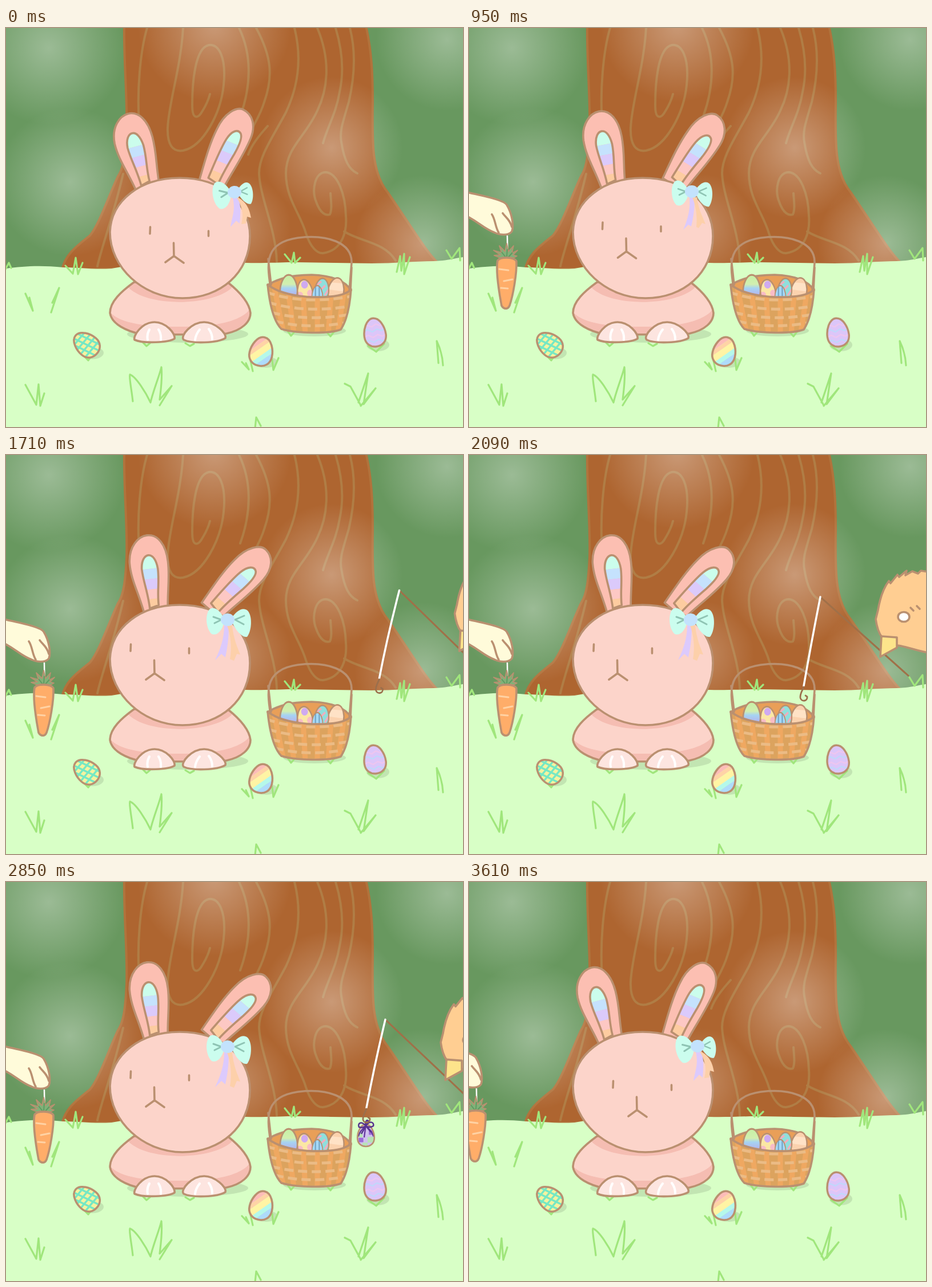
An HTML page that plays this animation: 800x700 px, repeating every 3.8 s.

```html
<!DOCTYPE html>
<html lang="en">
<head>
<meta charset="utf-8">
<title>Spring bunny</title>
<style>
html, body { margin: 0; width: 100%; height: 100%; overflow: hidden; background: #d8ffc6; }
svg { display: block; width: 100%; height: 100%; }
.ink { stroke: #ba9070; stroke-width: 3.6; stroke-linecap: round; stroke-linejoin: round; }
.line { fill: none; }
.grain { fill: none; stroke: #b07d45; stroke-width: 4; stroke-linecap: round; }
.grass { fill: none; stroke: #a0e67c; stroke-width: 3.2; stroke-linecap: round; stroke-linejoin: round; }
.shade { fill: #a9c79c; opacity: .45; }
</style>
</head>
<body>
<svg viewBox="0 0 800 700" xmlns="http://www.w3.org/2000/svg">
<defs>
  <radialGradient id="glow">
    <stop offset="0" stop-color="#fff" stop-opacity=".34"/>
    <stop offset=".5" stop-color="#fff" stop-opacity=".17"/>
    <stop offset="1" stop-color="#fff" stop-opacity="0"/>
  </radialGradient>
  <linearGradient id="dawn" x2="0" y2="1">
    <stop offset=".1" stop-color="#c9f0a8"/>
    <stop offset=".35" stop-color="#d2efb0"/>
    <stop offset=".5" stop-color="#a6d3f3"/>
    <stop offset=".85" stop-color="#b9a9ea"/>
  </linearGradient>
  <path id="egg" d="M0-26C13-26 20-7 20 5C20 18 11 25 0 25C-11 25-20 18-20 5C-20-7-13-26 0-26Z"/>
  <clipPath id="eggClip"><use href="#egg"/></clipPath>
  <path id="basketShape" d="M458 450C480 468 520 473 556 472C578 471 598 467 604 458C602 488 596 514 586 529C565 537 508 536 482 528C470 516 462 490 458 450Z"/>
  <clipPath id="basketClip"><use href="#basketShape"/></clipPath>
  <path id="bodyShape" d="M224 446C202 462 182 480 182 500C185 520 212 532 236 537C285 538 350 538 386 536C413 530 428 516 428 500C426 482 408 462 388 446Z"/>
  <clipPath id="bodyClip"><use href="#bodyShape"/></clipPath>
  <path id="innerL" d="M-10-2C-10-30-16-50-16-72C-15-88-8-95-2-95C6-95 11-85 12-70C12-45 6-30 6-6Z"/>
  <path id="innerR" d="M-9-4C-9-30-9-60-6-78C-3-96 6-103 13-98C21-92 18-68 17-60C14-40 11-20 11 0Z"/>
  <clipPath id="clipL"><use href="#innerL"/></clipPath>
  <clipPath id="clipR"><use href="#innerR"/></clipPath>
  <g id="bands">
    <path fill="#cbfdec" d="M-30-110H30V-71H-30Z"/>
    <path fill="#c5e2fd" d="M-30-71H30V-53H-30Z"/>
    <path fill="#dbcafb" d="M-30-53H30V-35H-30Z"/>
    <path fill="#fdc8c4" d="M-30-35H30V-18H-30Z"/>
    <path fill="#fdcca0" d="M-30-18H30V8H-30Z"/>
  </g>
</defs>

<rect width="800" height="700" fill="#68985f"/>
<path d="M207-4C206 60 213 130 211 180C209 220 206 246 196 260C180 294 163 345 147 364C125 382 104 396 98 424L756 412C735 392 712 352 668 288C640 254 641 200 642 130C642 80 640 40 630-4Z" fill="#ae6530" stroke="#b1733c" stroke-width="4"/>
<g class="grain">
  <path d="M247 0C235 40 229 110 233 165M205 256C188 330 167 385 160 418"/>
  <path d="M310 0C306 70 285 130 283 175C282 205 292 218 310 215C345 208 376 150 381 100C386 50 372 28 355 30C330 35 326 100 326 135C326 165 338 156 343 147C350 136 355 124 357 116"/>
  <path d="M408 0C430 45 430 100 410 155M438 0C465 50 468 85 452 130C446 150 438 162 430 178M458 172C442 190 430 205 424 222"/>
  <path d="M505 0C520 60 508 110 490 148C465 195 443 225 443 255C445 300 472 350 474 410"/>
  <path d="M545 0C570 60 562 110 545 145C525 190 490 210 490 255C490 300 515 325 525 360C533 385 545 396 555 395C590 390 597 355 595 330C594 290 580 255 560 253C540 253 535 285 543 305C550 325 560 330 567 327C571 318 569 305 568 290"/>
  <path d="M577 0C592 50 590 85 584 112C578 150 562 175 555 202M602 0C615 50 607 100 600 130C588 170 584 182 587 200C592 232 600 248 615 255M592 357C620 375 662 375 682 408"/>
</g>
<g fill="url(#glow)">
  <circle cx="75" cy="35" r="135"/><circle cx="112" cy="270" r="130"/>
  <circle cx="772" cy="20" r="125"/><circle cx="365" cy="-5" r="135"/>
  <circle cx="570" cy="210" r="125"/><circle cx="730" cy="378" r="120"/>
  <circle cx="405" cy="350" r="95" opacity=".7"/>
</g>
<path fill="#d8ffc6" d="M0 422C30 418 60 416 100 420C130 420 150 424 185 422C220 415 260 410 300 411L420 412C450 413 480 411 500 411L640 413C680 413 715 409 750 409C775 408 790 403 800 402V700H0Z"/>

<g class="grass">
  <path d="M-2 425L5 412L9 421M104 417L117 431L122 403L126 432L134 412M34 466L47 496L41 473M79 499L93 456L81 482"/>
  <path d="M222 655C220 635 215 612 217 608C228 612 245 640 253 657C258 635 268 612 272 595C274 615 271 635 269 652L290 628L269 662"/>
  <path d="M34 626L53 661L57 625L60 663L67 641M593 624L603 629L621 662M617 657L634 606L626 660L647 632L621 663M757 588L754 549Q764 570 765 592"/>
  <path d="M436 702L438 683L446 698M684 428L690 400L692 426L697 396L697 432L707 402"/>
  <path d="M771 390L780 405L794 386L795 408M488 397L500 412L504 394L506 412L515 403"/>
</g>

<g class="shade">
  <ellipse cx="318" cy="537" rx="106" ry="15"/><ellipse cx="540" cy="531" rx="55" ry="10"/>
  <ellipse cx="151" cy="570" rx="20" ry="11"/><ellipse cx="455" cy="586" rx="20" ry="10"/>
  <ellipse cx="651" cy="556" rx="20" ry="11"/>
</g>
<g class="grass" stroke-width="2.5">
  <path d="M413 586L425 599L420 588M428 584L432 602M466 582L468 600L477 579M137 576L144 583L151 574M634 558L648 568L662 554M492 530L499 540L505 533M562 534L568 541L578 528M240 552L246 558L252 553M314 553L322 558L329 554"/>
</g>

<!-- eggs on the grass -->
<g transform="translate(141 555.500) rotate(-50) scale(.96)">
  <use href="#egg" fill="#f3f3a0"/>
  <path clip-path="url(#eggClip)" class="line" stroke="#75e8c4" stroke-width="3.500" d="M-22-17H22M-22-7H22M-22 3H22M-22 13H22M-18-28L-4 28M-7-28L7 28M4-28L18 28"/>
  <use href="#egg" class="ink line"/>
</g>
<g transform="translate(447 568) rotate(13)">
  <g clip-path="url(#eggClip)"><g transform="rotate(-48)">
    <path fill="#fdbcb8" d="M-40-40H40V-13H-40Z"/><path fill="#ffd3a6" d="M-40-13H40V-6H-40Z"/>
    <path fill="#fff4a4" d="M-40-6H40V5H-40Z"/><path fill="#b5f8ea" d="M-40 5H40V13H-40Z"/>
    <path fill="#aedbfb" d="M-40 13H40V40H-40Z"/>
  </g></g>
  <use href="#egg" class="ink line"/>
</g>
<g transform="translate(645.500 534.500) rotate(-8) scale(.95 .98)">
  <use href="#egg" fill="#dcc6f9"/>
  <g clip-path="url(#eggClip)" class="line" stroke-width="2.500" opacity=".75">
    <path stroke="#f3c6ec" d="M-20-12L-12-15L-4-11L4-15L12-11L20-14M-22 7L-13 3L-4 8L5 4L13 8L22 4"/>
    <path stroke="#b9dcfb" d="M-22-3L-13-7L-4-2L5-6L13-2L22-6M-22 16L-13 12L-4 17L5 13L13 17L22 13"/>
  </g>
  <use href="#egg" class="ink line"/>
</g>

<!-- basket back and handle -->
<path class="ink" fill="#e99f58" d="M458 451C480 437 510 433 535 433C565 434 592 441 604 460C570 482 490 480 458 451Z"/>
<path class="ink line" d="M463 454C456 410 454 376 512 368C562 362 606 376 605 412L601 462M459 405L464 450M605 420L603 460"/>

<!-- fishing rod and chick -->
<g id="fisher">
  <path id="rod" class="line" stroke="#a07048" stroke-width="3"/>
  <path id="thread" class="line" stroke="#fff" stroke-width="3.500" stroke-linecap="round"/>
  <g id="hook">
    <g id="prize">
      <g transform="translate(-1 49) scale(.74 .76)">
        <use href="#egg" fill="#cfc0ee"/>
        <g clip-path="url(#eggClip)">
          <path fill="#b7e3b5" d="M-20-10H-8V4H-20ZM4 3H20V16H4ZM-8 16H4V26H-8Z"/>
          <path fill="#9b6bd8" d="M-17 5H-6V15H-17ZM7-12H16V-2H7Z"/>
          <path class="line" stroke="#63359c" stroke-width="3" d="M0-26L-4 4M0-22Q-14-12-18 2M0-22Q14-12 18 2"/>
        </g>
        <use href="#egg" class="ink line"/>
      </g>
      <path class="line" stroke="#56328f" stroke-width="2.500" d="M-1 32C-10 22-16 28-13 34Q-7 36-1 32C6 21 14 26 12 32Q6 36-1 32L-9 46M-1 32L8 43M-1 32C-3 24 1 20 3 23Z"/>
    </g>
    <path class="line" stroke="#9b6f4c" stroke-width="2.800" stroke-linecap="round" d="M0 2C-3 9-7 15-6 21C-4 29 7 27 6 19L3 17"/>
  </g>
  <g id="chick">
    <path class="ink" fill="#ffce92" d="M815 207L791 203L786 208L776 204L764 211L766 203L753 214L750 210L738 225L735 221C722 238 718 260 716 272L712 288C714 303 717 312 723 320L749 334C765 335 778 343 815 349Z"/>
    <path class="ink" fill="#fde48b" d="M722 318L749 320L749 338L720 354Z"/>
    <ellipse class="ink" fill="#fff" cx="761" cy="284" rx="10" ry="8.500"/>
    <path class="ink line" stroke-width="3" d="M773 268L778 273M784 265L789 270"/>
  </g>
</g>

<!-- basket eggs and front -->
<g transform="translate(495 457) scale(.76 .92)"><use href="#egg" fill="url(#dawn)" class="ink"/></g>
<g transform="translate(578 459) scale(.7 .8) rotate(12)">
  <use href="#egg" fill="#fbd2ae"/><path clip-path="url(#eggClip)" fill="#ffe2c6" d="M-22-12L22-18V0L-22 4Z"/><use href="#egg" class="ink line"/>
</g>
<g transform="translate(523 461) scale(.66 .76) rotate(-10)">
  <use href="#egg" fill="#fbe7a4"/>
  <g clip-path="url(#eggClip)"><circle cx="2" cy="-14" r="9" fill="#cfaaf0"/><circle cx="-14" cy="8" r="8" fill="#f8bcc6"/><circle cx="13" cy="8" r="8" fill="#f8bcc6"/></g>
  <use href="#egg" class="ink line"/>
</g>
<g transform="translate(553 458) scale(.62 .72) rotate(8)">
  <use href="#egg" fill="#8fdfdc"/>
  <path clip-path="url(#eggClip)" class="line" stroke="#f0aebf" stroke-width="5" d="M-18-6L-4-18M-8 8L8-10M10 14L20-4"/>
  <use href="#egg" class="ink line"/>
</g>
<g transform="translate(545 469) scale(.48 .66)">
  <use href="#egg" fill="#a5d8f6"/>
  <path clip-path="url(#eggClip)" class="line" stroke="#6f9fc0" stroke-width="4" d="M-7-26V25M7-26V25"/>
  <use href="#egg" class="ink line"/>
</g>
<use href="#basketShape" fill="#dca35e"/>
<g clip-path="url(#basketClip)" class="line">
  <path stroke="#efa861" stroke-width="9" d="M469 452L485 530M494 462L504 536M520 466L524 538M545 468L545 538M569 466L564 538M592 460L581 534"/>
  <path stroke="#ebbb85" stroke-width="5" stroke-dasharray="16 8" d="M455 463Q520 487 608 470M458 481Q525 502 608 487M464 499Q530 516 604 502M470 514Q530 530 600 516"/>
</g>
<use href="#basketShape" class="ink line"/>

<!-- bunny -->
<use href="#bodyShape" fill="#fcd4ca"/>
<g clip-path="url(#bodyClip)" fill="#f5bdb2">
  <path d="M180 496C198 520 250 524 306 524C365 524 412 516 430 490V550H180Z"/>
  <path d="M215 440H395V456C360 488 250 490 215 456Z"/>
</g>
<use href="#bodyShape" class="ink line"/>
<g class="ink" fill="#fde5e0">
  <path d="M225 547C222 540 238 516 260 516C280 516 297 536 295 545C285 552 240 554 225 547Z"/>
  <path d="M311 547C304 540 325 516 347 516C365 516 387 535 384 544C370 553 325 554 311 547Z"/>
</g>
<path class="line" stroke="#fff" stroke-width="4" stroke-linecap="round" d="M251 529Q246 538 248 547M267 529Q272 537 271 547M339 529Q332 538 331 547M355 528Q361 536 361 546"/>
<g id="earL">
  <path class="ink" fill="#fcbfb2" d="M-21 4C-26-30-37-55-36-85C-34-115-15-130 0-130C19-130 31-110 31-80C31-50 24-30 21 4Z"/>
  <use href="#bands" clip-path="url(#clipL)"/><use href="#innerL" class="ink line"/>
</g>
<g id="earR">
  <path class="ink" fill="#fcbfb2" d="M-22 6C-26-30-30-60-28-88C-27-120-11-139 2-138C20-137 33-120 33-96C33-60 25-30 22 6Z"/>
  <g clip-path="url(#clipR)"><use href="#bands" transform="scale(1 1.080)"/></g><use href="#innerR" class="ink line"/>
</g>
<path class="ink" fill="#fcd4ca" d="M304 263C376 263 427 306 427 365C427 430 375 474 309 474C240 474 182 420 182 358C184 302 236 263 304 263Z"/>
<path id="face" class="ink line" d="M252.500 349L252 361M354.500 356V365M293.500 377L294 401M279 411L294 400L311 412"/>
<path id="ribbonA" fill="#dccafd"/><path id="ribbonB" fill="#fdd0aa"/>
<g id="bow">
  <g id="wingL">
    <path fill="#cbfdee" d="M-6 0C-10-14-24-26-32-18C-40-8-38 16-28 25C-16 30-6 12-6 0Z"/>
    <path class="line" stroke="#8fc4b4" stroke-width="3" stroke-linecap="round" d="M-25-5L-11 0L-23 6"/>
  </g>
  <g id="wingR">
    <path fill="#cbfdee" d="M6-2C14-14 26-24 35-16C44-6 42 20 34 30C24 32 10 14 6-2Z"/>
    <path class="line" stroke="#8fc4b4" stroke-width="3" stroke-linecap="round" d="M29-7L13 0L28 8"/>
  </g>
  <ellipse rx="12" ry="11" fill="#c3e2fd"/>
</g>

<!-- paw and carrot -->
<g id="treat">
  <g id="carrot">
    <path class="line" stroke="#fff" stroke-width="2.500" d="M67 364L67.500 394"/>
    <path fill="#82b178" stroke="#ba9070" stroke-width="1.800" stroke-linejoin="round" d="M56 404L44 399L55 398L43 390L57 394L53 382L63 392L66 378L69 392L78 382L75 395L85 390L77 398L84 400L75 405Z"/>
    <path class="line" stroke="#5f9b62" stroke-width="2" d="M65 403L57 393M66 402L67 388M68 403L76 394"/>
    <path class="ink" fill="#ffad69" d="M50 408C46 430 54 470 57 487C61 494 68 494 71 487C77 470 84 430 83 409C78 401 55 401 50 408Z"/>
    <path class="line" stroke="#ffd2a4" stroke-width="3" stroke-linecap="round" d="M53 423L69 425M61 444L76 441M56 456L68 457"/>
  </g>
  <path class="ink" fill="#fffbda" d="M-12 286C25 295 60 301 66 310C75 325 79 346 75 357C69 365 53 363 45 359C25 352 15 338-12 326Z"/>
  <path class="ink line" d="M40 327C46 335 46 350 52 359M59 325C65 333 72 337 75 349"/>
</g>
</svg>
<script>
const STEP = 190, STEPS = 20;
const el = id => document.getElementById(id);
const set = (id, name, value) => el(id).setAttribute(name, value);
const show = (id, on) => set(id, 'display', on ? 'inline' : 'none');
const mix = (a, b, k) => a + (b - a) * k;

const poses = [
  { left: [247, 276, -15], right: [361, 270, 22.5], face: [0, 0], bow: [400, 288, -6], wings: [1.04, .78],
    lilac: 'M397 298L407 297C411 312 411 325 409 343L403 338L393 349C396 330 402 320 397 298Z',
    peach: 'M403 296C421 304 426 317 429 333L422 331L420 343L412 344C417 325 412 310 403 296Z' },
  { left: [252, 274, -11], right: [361, 270, 31.5], face: [-18.5, -8], bow: [390, 287, 0], wings: [.95, .88],
    lilac: 'M386 297H395C395 320 392 336 389 348L384 345L375 354C383 335 388 318 386 297Z',
    peach: 'M391 297H399C402 320 409 330 414 344L408 342L402 351L398 349C400 330 397 312 391 297Z' },
  { left: [262, 270, -6.7], right: [363, 269, 41], face: [-34, -17], bow: [388, 289, 0], wings: [1, 1],
    lilac: 'M382 299H390C390 325 387 340 384 355L377 349L366 360C375 341 382 322 382 299Z',
    peach: 'M387 299H396C398 322 405 337 410 350L404 349L399 361L392 358C396 338 393 315 387 299Z' }
];

const place = ([x, y, turn]) => `translate(${x} ${y}) rotate(${turn})`;

function drawBunny(p) {
  set('earL', 'transform', place(p.left));
  set('earR', 'transform', place(p.right));
  set('face', 'transform', `translate(${p.face})`);
  set('bow', 'transform', place(p.bow));
  set('wingL', 'transform', `scale(${p.wings[0]})`);
  set('wingR', 'transform', `scale(${p.wings[1]})`);
  set('ribbonA', 'd', p.lilac);
  set('ribbonB', 'd', p.peach);
}

function drawFisher(step) {
  // reach: 0 at the stage edge, 1 over the basket
  const reach = step < 11 ? (step - 7) / 4 : step < 15 ? 1 : (17 - step) / 3;
  const dip = step === 12 ? 12 : step === 14 ? -18 : 0;
  const tipX = mix(762, 615, reach), tipY = mix(226, 249, reach) + Math.min(dip, 0);
  const endX = mix(721, 586, reach), endY = mix(378, 405, reach) + dip;
  set('rod', 'd', `M${tipX} ${tipY}l155 ${mix(163, 139, reach)}`);
  set('thread', 'd', `M${tipX} ${tipY}Q${mix(735, 599, reach)} ${mix(312, 330, reach)} ${endX} ${endY}`);
  set('hook', 'transform', `translate(${endX} ${endY})`);
  set('chick', 'transform', `translate(${(1 - reach) * 147} ${(reach - 1) * 20})`);
  show('prize', step >= 13);
}

function draw(ms) {
  const step = Math.floor(ms / STEP) % STEPS;
  const pose = step < 5 || step === 19 ? 0 : step === 5 || step === 18 ? 1 : 2;
  drawBunny(poses[pose]);

  show('treat', step >= 3);
  set('treat', 'transform', step === 3 || step === 19 ? 'translate(-54 -2)' : 'translate(0 0)');
  const swing = Math.max(0, 12 - 6 * Math.abs(step - 7));
  set('carrot', 'transform', `rotate(${swing} 67 364)`);

  const fishing = step >= 7 && step <= 17;
  show('fisher', fishing);
  if (fishing) drawFisher(step);
}

const start = performance.now();
function tick() {
  draw(performance.now() - start);
  requestAnimationFrame(tick);
}
tick();
</script>
</body>
</html>
```
